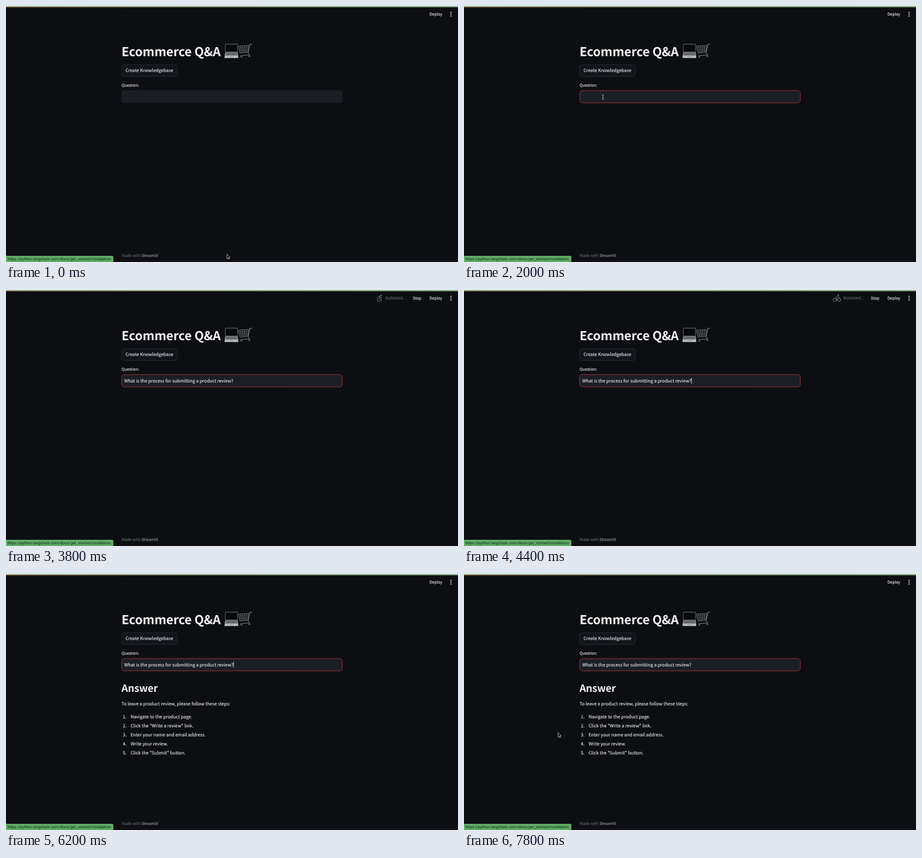
Animation, 800 px wide and 454 px high, one loop 8 s. Source, as an HTML page:

```html
<!DOCTYPE html>
<html lang="en">
<head>
<meta charset="utf-8">
<title>Ecommerce Q&amp;A</title>
<style>
  html, body { margin: 0; width: 100%; height: 100%; overflow: hidden; background: #0d0e12; }
  svg { display: block; width: 100%; height: 100%; }
  text {
    font-family: "Noto Sans CJK SC", "Noto Sans CJK JP", "Noto Sans CJK", sans-serif;
    font-size: 7.96px; fill: #f4f4f5; stroke: #f4f4f5; stroke-width: .1px;
    text-rendering: geometricPrecision; white-space: pre;
  }
  .small { font-size: 6.96px; }
  .title { font-size: 21.8px; font-weight: 700; letter-spacing: -.005em; stroke: none; }
  .header { font-size: 17.7px; font-weight: 600; letter-spacing: -.005em; stroke: none; }
  .hint { font-size: 5.96px; fill: #9a9ba0; stroke: none; }
  .dim { fill: #76777c; stroke: none; }
  .link { fill: #b9babd; stroke: none; }
  .url { font: 6.94px Roboto, sans-serif; fill: #0e2a14; stroke: none; }
  .icon { fill: none; stroke: #77787d; stroke-width: 1; stroke-linecap: round; stroke-linejoin: round; }
  .icon .head { fill: #77787d; stroke: none; }
</style>
</head>
<body>
<svg viewBox="0 0 800 454" preserveAspectRatio="none">
  <defs>
    <linearGradient id="edge">
      <stop offset="0" stop-color="#7a2a20"/>
      <stop offset=".5" stop-color="#54362a"/>
      <stop offset="1" stop-color="#3f5a40"/>
    </linearGradient>
    <linearGradient id="metal" x2="0" y2="1">
      <stop offset="0" stop-color="#8d8f91"/>
      <stop offset="1" stop-color="#c4c5c6"/>
    </linearGradient>
  </defs>

  <rect width="800" height="454" fill="#0d0e12"/>
  <rect y="1.4" width="800" height="1.2" fill="url(#edge)"/>
  <rect width="800" height="1.6" fill="#a3d0a0"/>
  <rect y="453" width="800" height="1" fill="#260c12"/>

  <text class="small" x="749.5" y="17.2">Deploy</text>
  <g fill="#f4f4f5">
    <circle cx="787.7" cy="11.3" r="1.05"/>
    <circle cx="787.7" cy="14.5" r="1.05"/>
    <circle cx="787.7" cy="17.7" r="1.05"/>
  </g>

  <g id="running">
    <g id="cyclist" class="icon">
      <circle cx="656.2" cy="17.3" r="2.9"/>
      <circle cx="664" cy="17.3" r="2.9"/>
      <path d="M660 18.5V15.4L657.7 13.3 660.4 11 662.3 13H664.6"/>
      <circle class="head" cx="662.3" cy="9.3" r="1.3"/>
    </g>
    <g id="wheelchair" class="icon">
      <path d="M658.4 14.2A3.2 3.2 0 1 0 663 18.4M658.4 11.6 661.6 11 660.4 15.4H663.8L664.6 19.4M662 13.2H664.6"/>
      <circle class="head" cx="663.6" cy="9.9" r="1.3"/>
    </g>
    <text class="small dim" x="671.6" y="17.2">RUNNING...</text>
    <text class="small" x="720" y="17.2">Stop</text>
  </g>

  <text class="title" x="204.5" y="89">Ecommerce Q&amp;A</text>

  <g id="laptop">
    <rect x="387.8" y="67.3" width="22.4" height="15" rx="1" fill="#77797b"/>
    <rect x="388.6" y="68.2" width="20.8" height="13" fill="#08090a"/>
    <path d="M388 82.2H410L411.2 91.4Q411.2 92.2 410.4 92.2H387.4Q386.6 92.2 386.7 91.4Z" fill="url(#metal)"/>
    <path d="M389.2 83.2H408.8L409.3 87.6H388.7Z" fill="#55575a"/>
    <path d="M389 84.7H409M388.8 86.2H409.2" stroke="#a0a2a4" stroke-width=".3"/>
    <path d="M395.6 88.5H402.6L402.9 91.2H395.3Z" fill="#a5a7a9"/>
  </g>
  <g id="cart" fill="none" stroke="#85878a" stroke-width=".8" stroke-linejoin="round" stroke-linecap="round">
    <path d="M411.6 71.2 430.4 70 428.6 82 414.6 83.2Z"/>
    <path d="M412.4 74.2 430 73M413.2 77.2 429.5 76M414 80.2 429 79" stroke-width=".6"/>
    <path d="M415 71 417.2 83M418.6 70.8 420 82.8M422.2 70.5 422.8 82.5M426 70.3 425.8 82.3" stroke-width=".6"/>
    <path d="M434.6 67.6 431.4 68.6 428.6 82 431 86.6 415.2 88.2" stroke="#a2a4a6"/>
    <path d="M434.8 67.6 431.6 68.4" stroke-width="1.4" stroke="#6e7073"/>
    <circle cx="416.4" cy="90.2" r="1.3"/>
    <circle cx="430.6" cy="89" r="1.3"/>
  </g>

  <rect x="204.7" y="104.2" width="98.6" height="20.6" rx="4.4" fill="#12141a" stroke="#363840" stroke-width=".7"/>
  <text x="211.5" y="117.2">Create Knowledgebase</text>

  <text class="small" x="204.5" y="143.3">Question:</text>
  <rect id="field" x="204.8" y="150" width="390.4" height="21.8" rx="4.4" fill="#1c1e25" stroke-width=".9"/>
  <text id="question" x="209.2" y="163.5">What is the process for submitting a product review?</text>
  <text id="hint" class="hint" x="591.8" y="169.2" text-anchor="end">Press Enter to apply</text>
  <rect id="caret" x="402.4" y="155.8" width=".8" height="10.2" fill="#f4f4f5"/>

  <g id="answer">
    <text class="header" x="204.5" y="209">Answer</text>
    <text x="204.5" y="232.8">To leave a product review, please follow these steps:</text>
  </g>

  <text class="small dim" x="204.5" y="445.2">Made with <tspan class="link">Streamlit</tspan></text>
  <path d="M0 443H187.4Q190 443 190 445.6V454H0Z" fill="#60ac66"/>
  <text class="url" x="2.4" y="451">https://python.langchain.com/docs/get_started/installation</text>

  <path id="arrow" d="M0 0V8.2L1.9 6.5 3.1 9.2 4.4 8.6 3.2 6H5.6Z" fill="#08090b" stroke="#e6e6e8" stroke-width=".7" stroke-linejoin="round"/>
  <path id="beam" d="M-1.8 -4Q0 -4 0 -3 0 -4 1.8 -4M0 -3V3M-1.8 4Q0 4 0 3 0 4 1.8 4M-1 1.4H1" fill="none" stroke="#b4b5b9" stroke-width=".9"/>
</svg>

<script>
  const LOOP = 8000, STEP = 200;
  const el = id => document.getElementById(id);
  const show = (id, on) => el(id).setAttribute("visibility", on ? "inherit" : "hidden");
  const ease = p => p * p * (3 - 2 * p);

  const steps = [
    "Navigate to the product page.",
    'Click the "Write a review" link.',
    "Enter your name and email address.",
    "Write your review.",
    'Click the "Submit" button.'
  ];

  function addText(x, y, content, anchor) {
    const node = document.createElementNS(el("answer").namespaceURI, "text");
    node.setAttribute("x", x);
    node.setAttribute("y", y);
    node.setAttribute("text-anchor", anchor);
    node.textContent = content;
    el("answer").append(node);
  }
  steps.forEach((step, i) => {
    addText(213.4, 255.9 + 16 * i, `${i + 1}.`, "end");
    addText(220.4, 255.9 + 16 * i, step, "start");
  });

  // Pointer stops: time, x, y
  const path = [
    [0, 391, 440], [400, 391, 440], [1600, 246, 161.5], [2200, 246, 161.5],
    [2800, 335.3, 293], [3000, 338, 298], [6800, 338, 298], [7800, 166.5, 281], [LOOP, 166.5, 281]
  ];

  function pointerAt(t) {
    const i = path.findIndex(stop => stop[0] > t);
    const [t0, x0, y0] = path[i - 1], [t1, x1, y1] = path[i];
    const p = ease((t - t0) / (t1 - t0));
    return [x0 + (x1 - x0) * p, y0 + (y1 - y0) * p];
  }

  function draw(time) {
    const t = Math.floor(time % LOOP / STEP) * STEP;
    const between = (from, to) => t >= from && t < to;

    el("field").setAttribute("stroke", t >= 2000 ? "#a43a3e" : "#1c1e25");
    show("question", t >= 2200);
    show("hint", between(2200, 3600));
    show("caret", t >= 2200 && t % 1000 >= 200 && t % 1000 < 600);
    show("answer", t >= 6000);

    const running = between(3600, 6200), cycling = t / STEP % 2 === 0;
    show("running", running);
    show("cyclist", running && cycling);
    show("wheelchair", running && !cycling);

    const [x, y] = pointerAt(t);
    const visible = !between(3000, 7000);
    const overField = x > 205 && x < 595 && y > 150 && y < 172;
    for (const id of ["arrow", "beam"]) el(id).setAttribute("transform", `translate(${x} ${y})`);
    show("arrow", visible && !overField);
    show("beam", visible && overField);
  }

  const start = performance.now();
  function tick() {
    draw(performance.now() - start);
    requestAnimationFrame(tick);
  }
  tick();
</script>
</body>
</html>
```
